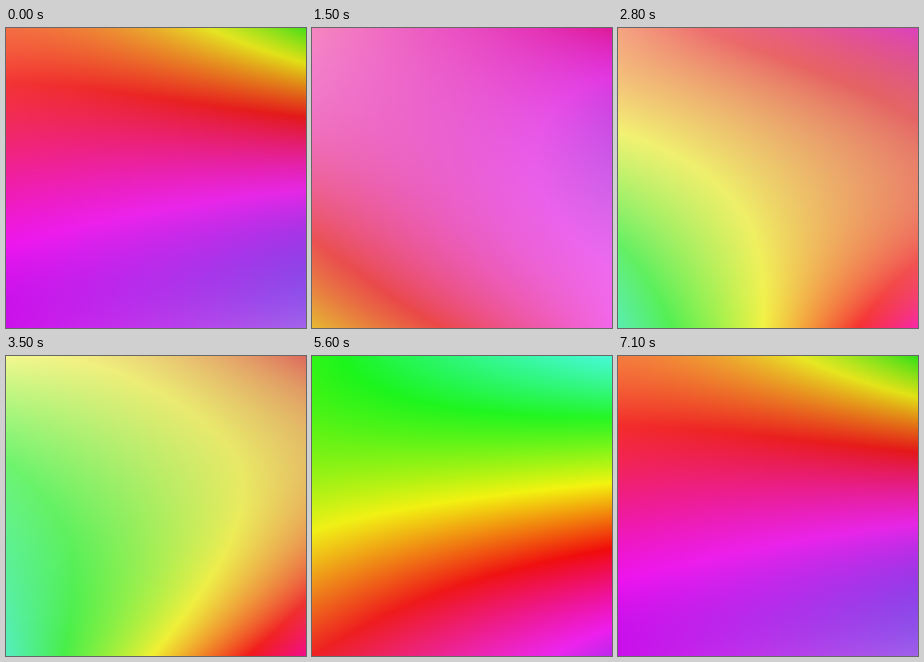
Animation, 300 px wide and 300 px high, one loop 7.2 s. Source, as an HTML page with a canvas:

```html
<!DOCTYPE html>
<html lang="en">
<head>
<meta charset="utf-8">
<title>Drifting hues</title>
<style>
  html, body { margin: 0; width: 100%; height: 100%; overflow: hidden; }
  canvas { display: block; width: 100vw; height: 100vh; }
</style>
</head>
<body>
<canvas id="stage" width="300" height="300"></canvas>
<script>
const SIZE = 300, LOOP = 7200, STEP = 100;

// Poses: hue in degrees on 3 x 4 points, saturation on 2 x 3, value on 2 x 2 (percent).
const poses = [
  { t: 0,
    hue: [14, 42, 105, -17, -18, -10, -55, -66, -80, -68, -75, -92],
    sat: [72, 90, 87, 84, 93, 58], val: [96, 87, 92, 92] },
  { t: 1500,
    hue: [-30, -44, -38, -36, -50, -70, -5, -42, -66, 45, -7, -56],
    sat: [45, 88, 58, 60, 78, 58], val: [96, 87, 90, 95] },
  { t: 2800,
    hue: [18, -15, -48, 58, 32, 2, 112, 54, 9, 155, 57, -38],
    sat: [47, 70, 55, 55, 62, 84], val: [96, 86, 93, 97] },
  { t: 3500,
    hue: [62, 46, 5, 118, 80, 42, 143, 88, 22, 162, 57, -33],
    sat: [42, 58, 58, 60, 64, 95], val: [97, 87, 93, 95] },
  { t: 4800,
    hue: [131, 130, 140, 130, 115, 100, 112, 68, 31, 72, 4, -54],
    sat: [76, 52, 78, 88, 72, 98], val: [96, 96, 94, 95] },
  { t: 6200,
    hue: [82, 128, 163, 52, 57, 57, -2, -20, -40, -44, -64, -87],
    sat: [93, 85, 96, 95, 94, 70], val: [96, 96, 92, 91] }
];
const count = poses.length;

function poseAt(i) {
  const lap = Math.floor(i / count), p = poses[i - lap * count];
  return { ...p, t: p.t + lap * LOOP };
}

// Smooth periodic curve through the poses.
function sample(time) {
  let i = count - 1;
  while (poses[i].t > time) i--;
  const [a, b, c, d] = [i - 1, i, i + 1, i + 2].map(poseAt);
  const dt = c.t - b.t, u = (time - b.t) / dt;
  const h00 = (1 + 2 * u) * (1 - u) ** 2, h10 = u * (1 - u) ** 2;
  const h01 = 1 - h00, h11 = u * u * (u - 1);
  const slope = (p, q, r, k, n) => {
    const d0 = q.t - p.t, d1 = r.t - q.t;
    const v0 = (q[k][n] - p[k][n]) / d0, v1 = (r[k][n] - q[k][n]) / d1;
    return (v0 * d1 + v1 * d0) / (d0 + d1);
  };
  const mix = k => b[k].map((v, n) =>
    h00 * v + h01 * c[k][n] + dt * (h10 * slope(a, b, c, k, n) + h11 * slope(b, c, d, k, n)));
  return { hue: mix("hue"), sat: mix("sat"), val: mix("val") };
}

// Polynomial weights of n evenly spaced points, for every pixel along one side.
function weights(n) {
  return Array.from({ length: SIZE }, (_, px) => {
    const u = (px + 0.5) / SIZE * (n - 1);
    return Array.from({ length: n }, (_, j) => {
      let w = 1;
      for (let m = 0; m < n; m++) if (m !== j) w *= (u - m) / (j - m);
      return w;
    });
  });
}
const W = { 2: weights(2), 3: weights(3), 4: weights(4) };

function rowOf(grid, cols, y) {
  const w = W[grid.length / cols][y], row = new Array(cols).fill(0);
  grid.forEach((v, n) => { row[n % cols] += v * w[Math.floor(n / cols)]; });
  return row;
}

const ctx = document.getElementById("stage").getContext("2d");
const image = ctx.createImageData(SIZE, SIZE);
const px = image.data;
const clamp = v => Math.max(0, Math.min(1, v));

function draw(time) {
  const { hue, sat, val } = sample(time);
  let o = 0;
  for (let y = 0; y < SIZE; y++) {
    const h = rowOf(hue, 3, y), s = rowOf(sat, 2, y), v = rowOf(val, 2, y);
    for (let x = 0; x < SIZE; x++) {
      const q = W[3][x], l = W[2][x];
      const sector = (h[0] * q[0] + h[1] * q[1] + h[2] * q[2] + 720) / 60;
      const S = clamp((s[0] * l[0] + s[1] * l[1]) / 100);
      const V = clamp((v[0] * l[0] + v[1] * l[1]) / 100);
      for (let n = 5; n > 0; n -= 2) {
        const k = (n + sector) % 6;
        px[o++] = 255 * V * (1 - S * Math.max(0, Math.min(k, 4 - k, 1)));
      }
      px[o++] = 255;
    }
  }
  ctx.putImageData(image, 0, 0);
}

const start = performance.now();
let shown = -1;
function tick() {
  const time = Math.floor((performance.now() - start) % LOOP / STEP) * STEP;
  if (time !== shown) draw(shown = time);
  requestAnimationFrame(tick);
}
tick();
</script>
</body>
</html>
```
